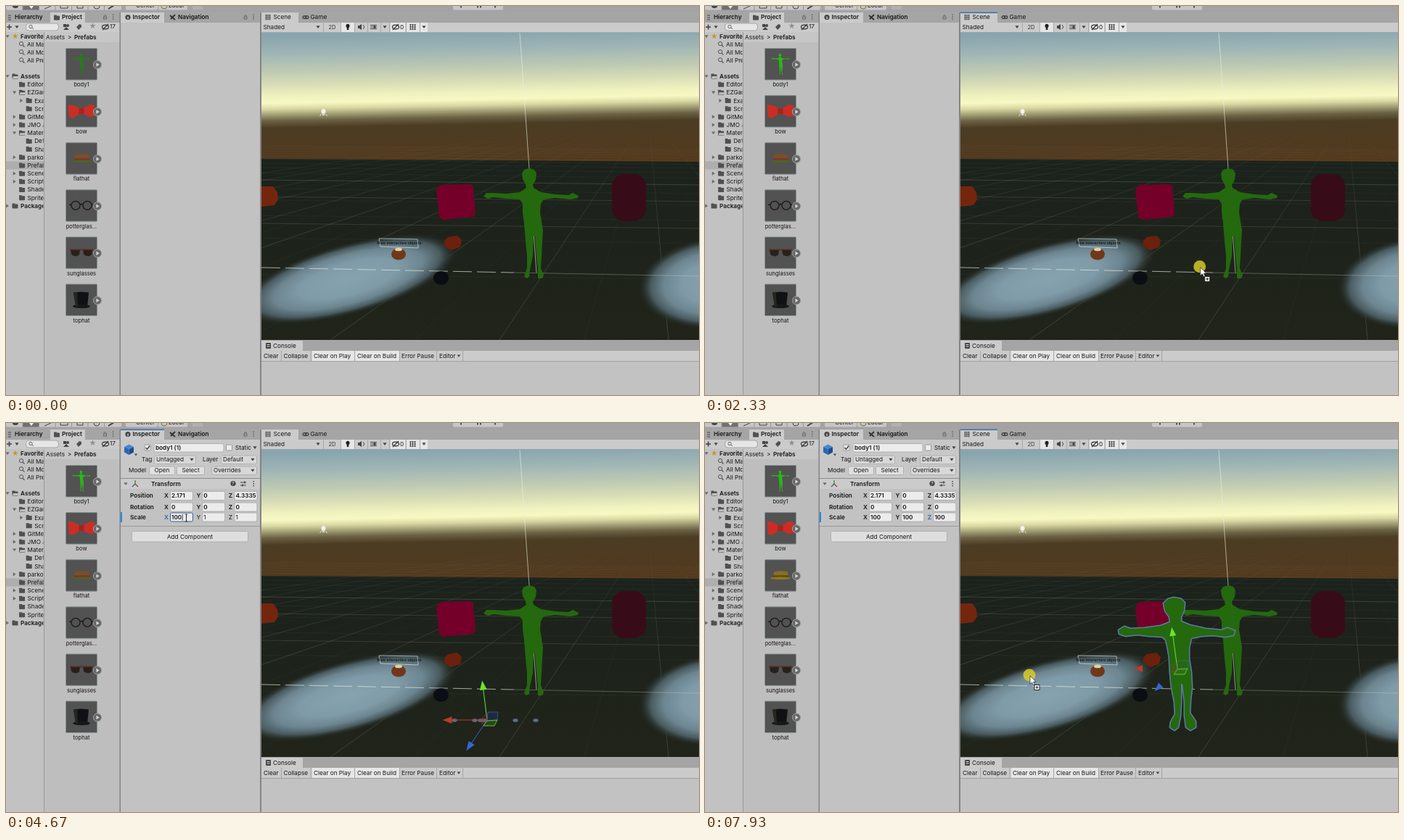
Animation, 955 px wide and 537 px high, one loop 8000 ms. Source, as an HTML page with a canvas:

```html
<!DOCTYPE html>
<html>
<head>
<meta charset="utf-8">
<style>
html, body { margin: 0; width: 100%; height: 100%; overflow: hidden; background: #c2c2c2; }
canvas { display: block; }
</style>
</head>
<body>
<canvas id="stage" width="955" height="537"></canvas>
<script>
const c = document.getElementById('stage').getContext('2d');
const LOOP = 8000, STEP = 77.8;
const INK = '#151515', BLUE = '#3a72b0', GREEN = '#24690e';

// Cursor keyframes: time, x, y
const PATH = [
  [70, 855, 524], [300, 640, 330], [620, 110, 120], [770, 42, 92], [860, 73, 76], [930, 76, 70],
  [1230, 95, 80], [1400, 97, 82], [1550, 103, 86], [1780, 103, 86], [1900, 250, 165], [2090, 540, 290],
  [2330, 685, 362], [2560, 665, 413], [3110, 665, 413], [3190, 600, 370], [3420, 170, 150],
  [3500, 97, 112], [3640, 230, 128], [3880, 248, 131], [6620, 248, 131], [6690, 238, 138],
  [7000, 130, 195], [7220, 96, 212], [7470, 96, 212], [7600, 180, 250], [7770, 350, 315], [7927, 448, 349]];

const farBody = new Path2D('M714 226L721 224L728 226L731 231L730 240L726 247L727 251L737 257L757 260L775 261L781 258' +
  'L789 262L788 265L778 267L757 265L741 267L737 273L736 285L738 297L740 310L739 325L738 345L737 362L741 372L739 376' +
  'L733 376L733 364L731 345L729 318L727 318L726 345L722 364L721 374L717 376L714 373L718 362L718 345L716 325L714 300' +
  'L712 285L712 273L708 267L690 266L672 264L664 266L658 263L662 258L671 258L690 259L708 257L717 251L716 246L712 239L711 231Z');
const nearBody = new Path2D('M638 243L646 241L656 243L661 248L660 259L656 268L656 274L668 279L690 284L712 286L720 283' +
  'L730 287L728 293L716 295L700 293L684 294L670 297L667 310L667 325L670 345L671 365L669 382L668 400L676 412L676 420' +
  'L669 424L663 420L661 404L661 385L658 360L656 360L656 385L655 404L652 420L647 424L641 420L642 413L648 402L647 385' +
  'L643 365L641 345L640 325L638 312L635 299L630 295L612 294L596 292L580 294L571 291L570 286L578 281L586 284L606 283' +
  'L628 280L641 275L640 268L634 259L632 249Z');

function rect(x, y, w, h, fill, radius = 0, stroke) {
  c.beginPath();
  c.roundRect(x, y, w, h, radius);
  if (fill) { c.fillStyle = fill; c.fill(); }
  if (stroke) { c.strokeStyle = stroke; c.lineWidth = 1; c.stroke(); }
}
function poly(points, fill, stroke, width = 1, open) {
  c.beginPath();
  for (let i = 0; i < points.length; i += 2) c.lineTo(points[i], points[i + 1]);
  if (!open) c.closePath();
  if (fill) { c.fillStyle = fill; c.fill(); }
  if (stroke) { c.strokeStyle = stroke; c.lineWidth = width; c.stroke(); }
}
const line = (x1, y1, x2, y2, color, width = 1) => poly([x1, y1, x2, y2], null, color, width, true);
function oval(x, y, rx, ry, fill, stroke, width = 1) {
  c.beginPath();
  c.ellipse(x, y, rx, ry, 0, 0, 7);
  if (fill) { c.fillStyle = fill; c.fill(); }
  if (stroke) { c.strokeStyle = stroke; c.lineWidth = width; c.stroke(); }
}
function text(s, x, y, bold, color = INK, align = 'left', size = 8.2) {
  c.font = `${bold ? 600 : 400} ${size}px Inter, Arial, sans-serif`;
  c.textAlign = align;
  c.textBaseline = 'middle';
  c.fillStyle = color;
  c.fillText(s, x, y + .5);
}
function arrow(x, y, down, color = '#6b6b6b', r = 2.6) {
  poly(down ? [x - r, y - r * .7, x + r, y - r * .7, x, y + r * .8]
            : [x - r * .7, y - r, x - r * .7, y + r, x + r * .8, y], color);
}
function clip(x, y, w, h, draw) {
  c.save();
  c.beginPath();
  c.rect(x, y, w, h);
  c.clip();
  draw();
  c.restore();
}
function gradient(x1, y1, x2, y2, stops) {
  const g = c.createLinearGradient(x1, y1, x2, y2);
  stops.forEach(([at, color]) => g.addColorStop(at, color));
  return g;
}
function lockAndMenu(x, y) {
  rect(x - 1.5, y - .5, 4, 3, null, 0, '#666');
  c.beginPath(); c.arc(x + .5, y - 1.2, 1.6, 3.1, 6.2); c.stroke();
  for (const d of [-3, 0, 3]) rect(x + 11, y + d - .9, 1.2, 1.2, '#444');
}
function tab(x, w, label, textX, active, focused) {
  if (active) rect(x, 9, w, 14, '#cbcbcb');
  if (focused) rect(x, 8.5, w, 1.5, BLUE);
  text(label, textX, 15.5, label !== 'Scene' && label !== 'Game');
}
function folder(x, y, open) {
  rect(x - 4, y - 3.5, 4, 2, '#505050', .5);
  rect(x - 4, y - 2.5, 8, 6, '#505050', .7);
  if (open) poly([x - 2.5, y, x + 5, y, x + 3.5, y + 3, x - 3.5, y + 3], '#c2c2c2');
}

function topBar() {
  rect(0, 0, 955, 9, '#a3a3a3');
  rect(0, 0, 159, 5.5, '#c6c6c6', [0, 0, 2, 2]);
  rect(23, 0, 23, 5.5, '#707070');
  for (let x = 23; x < 150; x += 22.5) line(x, 0, x, 5.5, '#949494');
  oval(13, 0, 4, 3, '#444');
  poly([32, 0, 38, 0, 35, 4], '#eee');
  line(53, 4, 62, 0, '#444');
  rect(75, -3, 10, 6, null, 0, '#444');
  rect(98, -3, 8, 6, null, 0, '#444');
  oval(125, 0, 4, 4, null, '#444');
  line(141, 4, 149, -1, '#444', 2);
  rect(165, 0, 44, 5.5, '#c6c6c6', [0, 0, 2, 2]);
  rect(210, 0, 40, 5.5, '#c6c6c6', [0, 0, 2, 2]);
  text('Center', 179, -1); text('Local', 224, -1);
  oval(218, 0, 4, 4, null, '#6c7a35');
  rect(257, 0, 14, 5, '#b0b0b0');
  rect(616, 0, 69, 5.5, '#c6c6c6', [0, 0, 2, 2]);
  for (const x of [626, 649, 653, 673]) rect(x, 0, 2, 2.5, '#555');
  rect(0, 8, 955, 15, '#a5a5a5');
}

function projectTree() {
  rect(0, 36, 52, 501, '#c2c2c2');
  rect(0, 214.5, 52, 11, '#aeaeae');
  clip(0, 36, 51.5, 501, () => {
    arrow(2, 42, true);
    text('★', 8, 42, false, '#c09522', 'left', 9);
    text('Favorites', 20, 42, true);
    ['All Materials', 'All Models', 'All Prefabs'].forEach((s, i) => {
      const y = 53 + i * 11.1;
      oval(21, y - 1, 2.6, 2.6, null, '#555'); line(23, y + 1, 25.5, y + 3.5, '#555', 1.3);
      text(s, 29, y);
    });
    // depth, label, state (o open, c closed, blank leaf)
    [[0, 'Assets', 'o'], [1, 'Editor', ''], [1, 'EZGame', 'o'], [2, 'Examples', 'c'], [2, 'Scripts', ''],
     [1, 'GitMerge', 'c'], [1, 'JMO Assets', 'c'], [1, 'Materials', 'o'], [2, 'Default', ''], [2, 'Shaders', ''],
     [1, 'parkour', 'c'], [1, 'Prefabs', ''], [1, 'Scenes', 'c'], [1, 'Scripts', 'c'], [1, 'Shaders', ''],
     [1, 'Sprites', ''], [0, 'Packages', 'c']].forEach(([depth, label, state], i) => {
      const y = 97 + i * 11.18, x = depth * 9.6;
      if (state) arrow(2 + x, y, state === 'o');
      folder(12.5 + x, y, state === 'o');
      text(label, 20 + x, y, !depth);
    });
  });
}

function thumbnail(i, label, selected, draw) {
  const y = 80 + i * 65.1;
  rect(82.5, y - 21.5, 43, 43.5, selected ? '#464e60' : '#525252', 1, '#84908f');
  c.save(); c.translate(104, y); draw(); c.restore();
  oval(126, y + 1, 5.6, 5.6, '#686868', '#a2a2a2');
  arrow(126.4, y + 1, false, '#d6d6d6', 2.8);
  if (selected) rect(91.5, y + 23.5, 24.5, 10, BLUE, 1);
  text(label, 104, y + 28.5, false, selected ? '#fff' : INK, 'center', 7.6);
}

function project(s) {
  tab(0, 61, 'Hierarchy', 12, false);
  tab(61, 48, 'Project', 77, true, s.focus === 'project');
  folder(70, 16);
  lockAndMenu(136, 15.5);
  for (const d of [-3, 0, 3]) rect(3, 15.5 + d, 4, 1, '#444');
  rect(0, 23, 157, 13, '#cbcbcb');
  line(1, 29, 8, 29, '#444', 1.6); line(4.5, 25.5, 4.5, 32.5, '#444', 1.6); arrow(15, 29, true, '#444');
  rect(27.5, 24, 45, 10, '#e6e6e6', 4, '#a4a4a4');
  oval(34, 28.5, 2.2, 2.2, null, '#666'); line(36, 30, 38, 32, '#666');
  rect(79, 25, 4, 4, '#444'); oval(85, 27, 2, 2, '#444'); poly([79, 33, 83, 29, 87, 33], '#444');
  poly([97, 29, 101, 25, 104, 26, 104, 29, 100, 33], '#505050');
  text('★', 114.5, 28, false, '#8d8d8d', 'left', 9.5);
  oval(137, 29, 4.5, 2.8, null, '#333', 1.2); line(133, 33, 141, 25, '#333', 1.2);
  text('17', 143, 28.5);
  projectTree();
  rect(52, 36, 105, 501, '#bebebe');
  rect(52, 36, 105, 14, '#c6c6c6');
  line(52.5, 36, 52.5, 537, '#999');
  text('Assets', 55, 43); text('>', 85, 43); text('Prefabs', 94, 43, true);

  thumbnail(0, 'body1', s.bodySelected, () => {
    c.scale(.19, .19); c.translate(-724, -300);
    c.fillStyle = s.bodyBright ? '#2cb61a' : '#287c1b'; c.fill(farBody);
  });
  thumbnail(1, 'bow', false, () => {
    poly([-18, -9, -11, -8, -3, -4, 3, -4, 11, -9, 18, -8, 18, 7, 11, 8, 3, 4, -3, 4, -12, 10, -17, 8, -18, 0], '#cb2d25');
    rect(-3.5, -4, 7, 8, '#a8231d', 1);
  });
  thumbnail(2, 'flathat', s.hatSelected, () => {
    poly([-9, -5, 0, -6, 10, -5, 11, 3, -10, 3], s.hatBright ? '#877023' : '#77502a');
    rect(-10, 0, 21, 3, s.hatBright ? '#5f4a17' : '#83332a');
    oval(0, 4, 14, 1.7, s.hatBright ? '#8c7a20' : '#4c6428');
  });
  thumbnail(3, 'potterglas...', false, () => {
    for (const x of [-8, 8]) oval(x, 0, 6, 6, null, '#191919', 1.3);
    poly([-2, -1, 0, -2, 2, -1], null, '#191919', 1.3, true);
    line(-17, -1, -14, -1, '#191919', 1.3); line(14, -1, 17, -1, '#191919', 1.3);
  });
  thumbnail(4, 'sunglasses', false, () => {
    for (const x of [-15, 2]) poly([x, -4, x + 13, -4, x + 12, 3, x + 8, 5, x + 3, 4, x + 1, 2], '#28201a');
    line(-16, -4, 16, -4, '#5a2c1f', 1.5);
  });
  thumbnail(5, 'tophat', false, () => {
    poly([-11, -10, 0, -11, 10, -10, 8, 9, -8, 9], '#101114');
    oval(0, 9, 12, 2.8, '#16171a');
    poly([-11, -10, -6, -10, -5, 9, -8, 9], '#25271f');
  });
}

function field(x, y, value, bold, focused, marked) {
  rect(x + .5, y - 6, 31, 12, '#ececec', 2, focused ? '#3d5f96' : '#b0b0b0');
  if (marked) rect(x + 2, y - 5, 5, 10, '#7fa6dc');
  clip(x, y - 6, 31, 12, () => text(value, x + 2, y, bold));
  if (focused && !marked) {
    const end = x + 3 + c.measureText(value).width;
    line(end, y - 4.5, end, y + 4.5, '#222', .8);
  }
}
function button(x, y, w, label, drop) {
  rect(x + .5, y - 5.5, w - 1, 11.5, drop ? '#d8d8d8' : '#e0e0e0', 2, '#b0b0b0');
  if (drop) { text(label, x + 3, y); arrow(x + w - 6, y, true, '#444'); }
  else text(label, x + w / 2, y, false, INK, 'center');
}

function inspector(s) {
  rect(158, 23, 192, 514, '#c2c2c2');
  tab(158, 60, 'Inspector', 174.5, true, s.focus === 'inspector');
  oval(168, 15.5, 3.6, 3.6, '#444'); rect(167.4, 14.5, 1.3, 3.5, '#ddd');
  tab(219, 70, 'Navigation', 237, false);
  line(226, 13, 233, 19, '#333', 2); line(233, 12, 227, 18, '#333', 2);
  lockAndMenu(329.5, 15.5);
  if (!s.shown) return;

  rect(158, 23, 192, 53, '#c8c8c8');
  poly([163, 33, 169.5, 29.5, 176, 33, 169.5, 36], '#4a86cc');
  poly([163, 33, 169.5, 36, 169.5, 44, 163, 40.5], '#2a66b4');
  poly([176, 33, 169.5, 36, 169.5, 44, 176, 40.5], '#1d4d92');
  arrow(179, 44, true, '#444', 2);
  rect(191, 30, 8, 8, '#ececec', 1, '#999'); poly([192.5, 34, 194.5, 36.3, 198, 31.5], null, '#333', 1.3, true);
  rect(204, 28.5, 96, 11.5, '#ececec', 2, '#b0b0b0'); text('body1 (1)', 206, 34, true);
  rect(303.5, 30, 8, 8, '#ececec', 1, '#999'); text('Static', 316, 34); arrow(343, 34, true, '#444');
  text('Tag', 187, 50.5); button(204, 50.5, 58, 'Untagged', true);
  text('Layer', 271, 50.5); button(296, 50.5, 50, 'Default', true);
  text('Model', 169, 65.5); button(197, 65.5, 36, 'Open'); button(235, 65.5, 39, 'Select');
  button(283, 65.5, 63, 'Overrides', true);
  line(158, 76.5, 350, 76.5, '#8d8d8d');
  rect(158, 77, 192, 14, '#cbcbcb');
  arrow(165, 84, true);
  line(178, 84, 178, 79, '#3b8b2c', 1.3); line(178, 84, 174, 88, '#2c59b5', 1.3); line(178, 84, 182, 88, '#b33a2c', 1.3);
  text('Transform', 200, 84, true);
  oval(313, 83.5, 3.6, 3.6, '#444'); text('?', 313, 83.5, true, '#ddd', 'center', 6);
  line(323, 82, 331, 82, '#444'); line(323, 86, 331, 86, '#444'); rect(328, 80.5, 1.5, 3, '#444'); rect(325, 84.5, 1.5, 3, '#444');
  for (const d of [-3, 0, 3]) rect(340.5, 83 + d, 1.4, 1.4, '#444');

  const axes = ['X', 'Y', 'Z'];
  [['Position', 100.5, ['2.171', '0', '4.3335']], ['Rotation', 116, ['0', '0', '0']], ['Scale', 130, s.scale]].forEach(([label, y, values], row) => {
    const isScale = row === 2;
    text(label, 171, y, !isScale || s.overridden);
    axes.forEach((axis, i) => {
      const bold = !isScale || +values[i] > 1, active = isScale && s.axis === i;
      text(axis, 218 + i * 44.4, y, bold, active ? '#2c61ad' : INK);
      field(226 + i * 44.2, y, values[i], bold, active && s.focus === 'inspector', active && s.marked);
    });
  });
  if (s.overridden) rect(158, 123, 2, 14, '#1a8fe0');
  line(158, 142.5, 350, 142.5, '#999');
  rect(173.5, 149.5, 160, 14.5, '#dedede', 2, '#b0b0b0');
  text('Add Component', 253.5, 157, false, INK, 'center');
}

function spot(x, y, rx, ry, turn) {
  c.save();
  c.translate(x, y); c.rotate(turn); c.scale(rx, ry);
  const g = c.createRadialGradient(0, 0, 0, 0, 0, 1);
  [[0, '#86a3af'], [.45, '#7f9ba8'], [.68, '#6c8590'], [.84, '#485a5e'], [1, '#1e231c00']].forEach(([at, color]) => g.addColorStop(at, color));
  oval(0, 0, 1, 1, g);
  c.restore();
}

function world() {
  const backdrop = [[37, '#8aa5af'], [60, '#9fb5b5'], [85, '#bfcab3'], [105, '#dbdfb6'], [120, '#f1f3bf'], [129, '#f7f8c3'],
    [137, '#d8d7a2'], [145, '#a09c72'], [153, '#6b6244'], [163, '#4b3c23'], [215, '#53391d']];
  rect(352, 36, 603, 180, gradient(650, 37, 653.5, 215, backdrop.map(([y, color]) => [(y - 37) / 178, color])));
  poly([352, 211, 955, 215, 955, 461, 352, 461], gradient(0, 213, 0, 460, [[0, '#1b221c'], [1, '#20241a']]));
  const fading = alpha => gradient(0, 165, 0, 330, [[0, 'rgba(210,215,200,0)'], [1, `rgba(210,215,200,${alpha})`]]);
  const major = fading(.2), minor = fading(.04);
  for (let i = -14; i < 16; i++) line(885, 151, 447 + i * 116.5, 461, i % 2 ? minor : major, .8);
  for (let i = 0; i < 17; i++) {
    const y = 152 + 310 / (1 + i * .42);
    line(352, y, 955, y + 7, 'rgba(210,215,200,.06)', .7);
  }
  spot(472, 377, 156, 49, -.27);
  spot(982, 382, 112, 64, -.1);
  for (const y of [240, 263, 300]) line(352, y, 955, y + 7, 'rgba(210,215,200,.18)', .8);
  c.setLineDash([26, 7]);
  line(352, 361, 700, 368, 'rgba(235,240,225,.65)');
  c.setLineDash([]);
  line(700, 368, 955, 373, 'rgba(220,225,210,.3)');
  line(708, 37, 731, 368, 'rgba(235,238,225,.6)');

  oval(437.5, 145.5, 3, 3.5, '#f2f2ea'); rect(436, 148, 3, 3, '#d8d8cc');
  line(432.5, 152, 434.5, 149, '#ddd'); line(442.5, 152, 440.5, 149, '#ddd');
  poly([352, 249, 368, 249, 374, 257, 375, 267, 370, 275, 352, 277], '#74260d');
  poly([596, 249, 600, 247, 640, 246, 644, 249, 647, 287, 644, 291, 602, 295, 597, 291, 593, 255], '#740029');
  rect(835, 232, 47, 65, '#380b19', 17);
  poly([609, 319, 622, 317, 628, 323, 626, 333, 613, 337, 604, 331, 604, 324], '#6b210c');
  oval(541, 342.5, 10, 8, '#71371a'); oval(541, 336, 5, 2.3, '#ddd3a4');
  poly([514, 321, 567, 322, 568, 334, 516, 332], null, 'rgba(235,240,235,.8)', .8);
  text('New interactive objects', 542, 327, true, '#151b1d', 'center', 5.4);
  oval(599.5, 375.5, 10.5, 9.5, '#0b0d14');
  c.fillStyle = GREEN; c.fill(farBody);
}

function cone(x, y, dx, dy, color, size) {
  const n = Math.hypot(dx, dy), ux = dx / n * size, uy = dy / n * size;
  poly([x + ux, y + uy, x - ux - uy * .75, y - uy + ux * .75, x - ux + uy * .75, y - uy - ux * .75], color);
}
function gizmo(ox, oy, up, left, front, size, onlyUpLine) {
  [[up, '#6be52e'], [left, '#c03a23'], [front, '#3466d6']].forEach(([tip, color]) => {
    if (tip === up || !onlyUpLine) line(ox, oy, ...tip, color);
    cone(...tip, tip[0] - ox, tip[1] - oy, color, size);
  });
  poly([ox + 1, oy - 11, ox + 15, oy - 11, ox + 14, oy + 1, ox, oy + 1], onlyUpLine ? null : 'rgba(30,45,90,.6)', '#3f5d9a', .8);
  poly([ox - 1, oy - 8, ox - 6, oy - 3, ox - 7, oy + 6, ox - 1, oy], null, '#a33a26', .8);
  poly([ox, oy + 1, ox + 14, oy, ox + 10, oy + 8, ox - 5, oy + 8], 'rgba(60,120,30,.4)', '#6fc53e', .9);
}

function newBody([x, y, z]) {
  if (y < 10) {
    if (x > 1) for (const dx of [-46, -18, -10, -5, 38, 66]) oval(664 + dx * x / 100, 410.5, 3.5, 2.2, '#5f7480', '#46567c', .8);
    gizmo(663, 410, [657, 362], [608, 410], [638, 447], 6.5);
    return;
  }
  const flat = y < 100, deep = z === 100;
  const height = flat ? .092 : deep ? 1 : .925, foot = deep ? 424 : 412, lean = deep ? 0 : .045;
  const shape = new Path2D();
  shape.addPath(nearBody, new DOMMatrix([1, 0, lean, height, -288 * lean, foot - height * 424]));
  c.lineJoin = 'round'; c.strokeStyle = '#5f78a6'; c.lineWidth = 3; c.stroke(shape);
  c.lineJoin = 'miter';
  c.fillStyle = GREEN; c.fill(shape);
  if (flat) gizmo(662, 403, [656, 354], [606, 402], [637, 438], 6);
  else if (deep) gizmo(651, 339, [644, 288], [597, 339], [624, 366], 6, true);
  else gizmo(655, 335, [648, 284], [601, 335], [629, 361], 6, true);
}

function sceneView(s) {
  tab(352, 51, 'Scene', 368.5, true, s.focus === 'scene');
  for (const d of [-2.5, 0, 2.5]) { line(357, 15.5 + d, 365, 15.5 + d, '#444', .8); line(361 + d, 11.5, 361 + d, 19.5, '#444', .8); }
  tab(404, 45, 'Game', 419.5, false);
  rect(408.5, 13, 9, 5, '#444', 2.5); oval(411, 15.5, 1, 1, '#bbb'); oval(415, 15.5, 1, 1, '#bbb');
  rect(352, 23, 603, 13, '#cbcbcb');
  text('Shaded', 354.5, 29); arrow(430, 29, true, '#444');
  text('2D', 444.5, 29, false, '#333', 'left', 7.5);
  rect(462, 23, 18, 13, '#e6e6e6'); oval(471, 27.5, 2.5, 2.7, '#222'); rect(469.8, 29, 2.5, 4, '#222');
  poly([485, 27, 487, 27, 490, 25, 490, 33, 487, 31, 485, 31], '#444');
  c.strokeStyle = '#444'; c.lineWidth = 1; c.beginPath(); c.arc(490, 29, 3.5, -1, 1); c.stroke();
  for (const d of [-2.5, 0, 2.5]) line(502, 29 + d, 511, 29 + d, '#444');
  oval(508, 29, 1.7, 1.7, '#333');
  arrow(522, 29, true, '#444');
  rect(530, 23, 20, 13, '#e6e6e6'); oval(537, 29, 4.5, 2.8, null, '#333', 1.2); line(533, 33, 541, 25, '#333', 1.2); text('0', 543, 29);
  rect(552, 23, 29, 13, '#e6e6e6');
  for (const d of [-3, 0, 3]) { line(556, 29 + d, 565, 29 + d, '#333', .8); line(560.5 + d, 25, 560.5 + d, 33, '#333', .8); }
  arrow(576, 29, true, '#444');
  for (const x of [437, 461, 480, 498, 516, 528, 551, 570]) line(x + .5, 23, x + .5, 36, '#aaa');
  clip(352, 36.5, 603, 424.5, () => { world(); if (s.shown) newBody(s.scale); });
}

function consolePane() {
  rect(352, 461, 603, 15, '#a5a5a5');
  rect(352, 462, 57, 14, '#cbcbcb');
  rect(358, 465, 7, 8, '#444', 1); line(359.5, 467.5, 363.5, 467.5, '#ddd'); line(359.5, 470, 363.5, 470, '#ddd');
  text('Console', 368, 469.5);
  rect(352, 476, 603, 14, '#cbcbcb');
  rect(422, 476, 120, 14, '#e6e6e6');
  [['Clear', 355], ['Collapse', 382.5], ['Clear on Play', 424], ['Clear on Build', 484], ['Error Pause', 545], ['Editor', 597]].forEach(([s, x]) => text(s, x, 483));
  arrow(624, 483, true, '#444', 2.3);
  for (const x of [379, 419.5, 480, 542, 593, 629]) line(x + .5, 476, x + .5, 490, '#a6a6a6');
  line(352, 490.5, 955, 490.5, '#a0a0a0');
  rect(352, 491, 603, 46, '#c2c2c2');
}

function cursor(t, [x, y]) {
  const typing = t >= 3870 && t < 6680, ringed = t >= 1400 && t < 1790;
  const dragging = (t >= 1790 && t < 2900) || t >= 7540;
  if (typing) {
    line(x + .5, y - 5, x + .5, y + 5, '#26324a', 1.1);
    for (const d of [-5, 5]) line(x - 1.5, y + d, x + 2.5, y + d, '#26324a', .8);
    return;
  }
  const pressed = (t >= 1400 && t < 2480) || t >= 7380;
  if (pressed) oval(x - 1, y - 1, 8.5, 8.5, 'rgba(222,208,38,.82)');
  if (ringed) {
    for (const r of [8, 5.5, 3]) oval(x, y, r, r, null, r === 5.5 ? '#6f6d1a' : '#e8dc2e', 1.3);
    return;
  }
  poly([x, y, x, y + 11.5, x + 2.6, y + 9, x + 4.6, y + 13, x + 6.4, y + 12, x + 4.6, y + 8.3, x + 8, y + 8.2], '#fff', '#222', .7);
  if (dragging) {
    rect(x + 6, y + 12.5, 7, 7, '#fff', 0, '#222');
    line(x + 7.5, y + 16, x + 11.5, y + 16, '#222');
    if (t > 7000 || t < 2400) line(x + 9.5, y + 14, x + 9.5, y + 18, '#222');
  }
}

function cursorAt(t) {
  const i = PATH.findIndex(p => p[0] > t);
  if (i < 0) return PATH.at(-1).slice(1);
  const [t0, x0, y0] = PATH[i - 1], [t1, x1, y1] = PATH[i], k = (t - t0) / (t1 - t0);
  return [x0 + (x1 - x0) * k, y0 + (y1 - y0) * k];
}
const typed = (t, ten, hundred) => t < ten ? 1 : t < hundred ? 10 : 100;

function draw(now) {
  const t = now % LOOP;
  const moveTime = 70 + Math.floor((t - 70) / STEP) * STEP;
  const s = {
    focus: t < 1550 ? '' : t < 2090 ? 'project' : t < 3880 ? 'scene' : t < 7390 ? 'inspector' : t < 7770 ? 'project' : 'scene',
    bodySelected: t >= 1400 && t < 2090,
    bodyBright: t >= 1400,
    hatSelected: t >= 7390 && t < 7770,
    hatBright: t >= 7390,
    shown: t >= 2410,
    scale: [typed(t, 4520, 4670), typed(t, 5070, 5220), typed(t, 5690, 5850)],
    axis: t < 3880 ? -1 : t < 4750 ? 0 : t < 5300 ? 1 : 2,
    marked: (t >= 3880 && t < 4370) || (t >= 4750 && t < 4900) || (t >= 5300 && t < 5540),
    overridden: t >= 4520
  };
  topBar();
  project(s);
  inspector(s);
  sceneView(s);
  consolePane();
  rect(156.5, 9, 1.5, 528, '#838383');
  rect(350, 9, 2, 528, '#838383');
  if (t >= 70) cursor(t, cursorAt(moveTime));
}

function frame() {
  draw(performance.now());
  requestAnimationFrame(frame);
}
frame();
</script>
</body>
</html>
```
